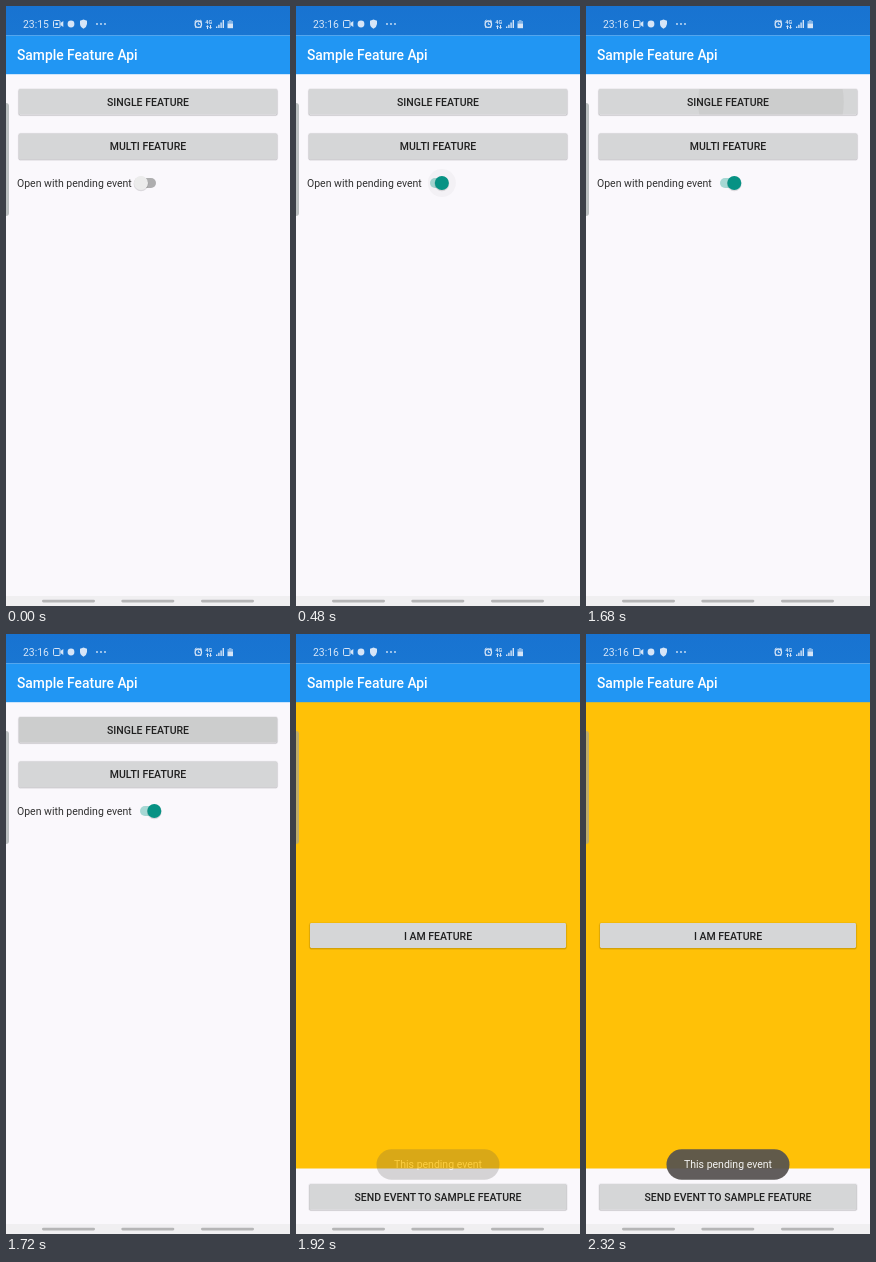
An HTML page that plays this animation: 284x600 px, repeating every 3.76 s.

```html
<!DOCTYPE html>
<html lang="en">
<head>
<meta charset="utf-8">
<title>Feature sample</title>
<style>
  html, body { margin: 0; width: 100%; height: 100%; overflow: hidden; background: #faf8fc; }
  svg { display: block; width: 100%; height: 100%; }
  text { font: 10.5px Roboto, sans-serif; fill: #303030; }
  .title { font-size: 13.85px; font-weight: 500; fill: #fff; }
  .button text { font-weight: 500; fill: #202020; text-anchor: middle; }
  .button .face { fill: #d5d6d7; }
  .button .shadow { fill: none; stroke: #000; }
  #toast text { fill: #f3f3f3; text-anchor: middle; }
  .status { fill: #d6e5f7; }
  .status text { fill: #d6e5f7; }
  .status .line { fill: none; stroke: #d6e5f7; }
</style>
</head>
<body>
<svg viewBox="0 0 284 600">
  <defs>
    <linearGradient id="statusShade" x2="0" y2="1">
      <stop offset="0" stop-color="#1873d1"/>
      <stop offset="1" stop-color="#1976d2"/>
    </linearGradient>
    <clipPath id="singleFace"><rect x="13" y="83" width="258" height="25.5" rx="1.4"/></clipPath>
  </defs>
  <rect width="284" height="600" fill="#faf8fc"/>

  <g id="menu">
    <g class="button" data-box="13 83 258 25.5" data-label="SINGLE FEATURE"></g>
    <g class="button" data-box="13 127.5 258 25.5" data-label="MULTI FEATURE"></g>
    <text x="11" y="181">Open with pending event</text>
    <rect id="track" x="134" y="172" width="16" height="10" rx="5"/>
    <circle id="ripple" cy="177" fill="#505858"/>
    <circle id="touch" cx="134.5" cy="175.5" r="11.5" fill="#555"/>
    <g id="thumb">
      <circle cy="177.8" r="7.4" fill="#000" opacity=".12"/>
      <circle id="knob" cy="177" r="7"/>
    </g>
  </g>

  <g id="feature">
    <rect y="68" width="284" height="466.5" fill="#ffc107"/>
    <g class="button" data-box="14 289 256 25" data-label="I AM FEATURE"></g>
    <g class="button" data-box="13.5 550 257 25.5" data-label="SEND EVENT TO SAMPLE FEATURE"></g>
    <g id="toast">
      <rect x="80.5" y="515.2" width="123" height="30.6" rx="15.3" fill="#555250" fill-opacity=".93"/>
      <text x="142" y="534">This pending event</text>
    </g>
  </g>

  <rect width="284" height="29.5" fill="url(#statusShade)"/>
  <rect y="29.5" width="284" height="38.7" fill="#2196f3"/>
  <text class="title" x="11" y="54.2">Sample Feature Api</text>

  <g class="status">
    <text id="clock" x="17" y="22" style="font-size:10.4px"></text>
    <rect id="camera" class="line" x="47.5" y="14.5" width="6.5" height="7" rx="1"/>
    <path d="M54.5 17L57.3 15V21L54.5 19Z"/>
    <circle id="lens" cx="50.7" cy="18" r="1.3"/>
    <circle cx="65" cy="18" r="3.4"/>
    <path d="M77.5 13.5L81 14.8V18Q80.8 21 77.5 22.7Q74.2 21 74 18V14.8Z"/>
    <circle cx="91" cy="18" r=".9"/><circle cx="95" cy="18" r=".9"/><circle cx="99" cy="18" r=".9"/>
    <circle class="line" cx="192.3" cy="18.2" r="3.2" stroke-width="1.3"/>
    <path class="line" d="M188.6 15.6L190.4 14M196 15.6L194.2 14M192.3 16.5V18.5H193.8M189.5 22L190.3 21M195.1 22L194.3 21" stroke-width="1"/>
    <text x="199.3" y="17.7" style="font-size:5.4px;font-weight:700">4G</text>
    <path d="M200 21L201.5 19L203 21H202V23H201V21ZM203 21L204.5 23L206 21H205V19H204V21Z"/>
    <path d="M210 20.5H211.4V22H210ZM212.2 18.7H213.6V22H212.2ZM214.4 16.5H215.8V22H214.4ZM216.6 14H218V22H216.6Z"/>
    <path d="M223 14H225.5V15H227V18H221.5V15H223Z" opacity=".55"/>
    <rect x="221.5" y="17.7" width="5.5" height="4.5"/>
  </g>

  <path d="M0 97Q3 97 3 100V207Q3 210 0 210Z" fill="#99a1a2" fill-opacity=".65"/>
  <rect y="590" width="284" height="10" fill="#f0eff1"/>
  <g fill="#b5b5b6">
    <rect x="36" y="593.8" width="53" height="2.6" rx="1.3"/>
    <rect x="115.3" y="593.8" width="53" height="2.6" rx="1.3"/>
    <rect x="195" y="593.8" width="53" height="2.6" rx="1.3"/>
  </g>
</svg>
<script>
const LOOP = 3760;
const $ = id => document.getElementById(id);
const set = (id, attrs) => {
  for (const name in attrs) $(id).setAttribute(name, attrs[name]);
};
const progress = (t, from, to) => Math.min(1, Math.max(0, (t - from) / (to - from)));
const easeInOut = p => (1 - Math.cos(Math.PI * p)) / 2;
const easeOut = p => 1 - (1 - p) ** 2;

for (const button of document.querySelectorAll('.button')) {
  const [x, y, w, h] = button.dataset.box.split(' ').map(Number);
  const box = (dy, attrs) => `<rect x="${x}" y="${y + dy}" width="${w}" height="${h}" rx="1.4" ${attrs}/>`;
  button.innerHTML =
    box(.5, 'class="shadow" stroke-width="2.4" opacity=".06"') +
    box(.7, 'class="shadow" stroke-width="1" opacity=".14"') +
    box(0, 'class="face"') +
    (button.dataset.label.startsWith('SINGLE')
      ? '<circle id="press" cx="185" cy="96" fill="#c9c9c9" clip-path="url(#singleFace)"/>' : '') +
    `<text x="${x + w / 2}" y="${y + h / 2 + 4.2}">${button.dataset.label}</text>`;
}

function draw(t) {
  const minutePassed = t >= 40;
  const on = t >= 280;
  const thumbX = 135 + 13.3 * easeInOut(progress(t, 280, 560));

  $('clock').textContent = minutePassed ? '23:16' : '23:15';
  set('camera', { fill: minutePassed ? '#d6e5f7' : 'none' });
  set('lens', { fill: minutePassed ? '#1976d2' : '#d6e5f7' });

  set('track', { fill: on ? '#a6d8d4' : '#aeaeaf' });
  set('thumb', { transform: `translate(${thumbX} 0)` });
  set('knob', { fill: on ? '#079284' : '#ececec' });
  set('touch', { opacity: t < 120 ? 0 : .55 * (1 - progress(t, 320, 440)) });
  set('ripple', {
    cx: thumbX,
    r: 7 + 7 * easeOut(progress(t, 120, 440)),
    opacity: t < 120 ? 0 : .1 * (1 - progress(t, 360, 560))
  });
  set('press', { r: t < 1680 ? 0 : 70 + 110 * progress(t, 1680, 1720), opacity: .7 });

  const opened = t >= 1760;
  set('menu', { visibility: opened ? 'hidden' : 'visible' });
  set('feature', { visibility: opened ? 'visible' : 'hidden' });
  set('toast', { opacity: easeOut(progress(t, 1880, 2200)) });
}

const start = performance.now();
function frame() {
  draw((performance.now() - start) % LOOP);
  requestAnimationFrame(frame);
}
frame();
</script>
</body>
</html>
```
